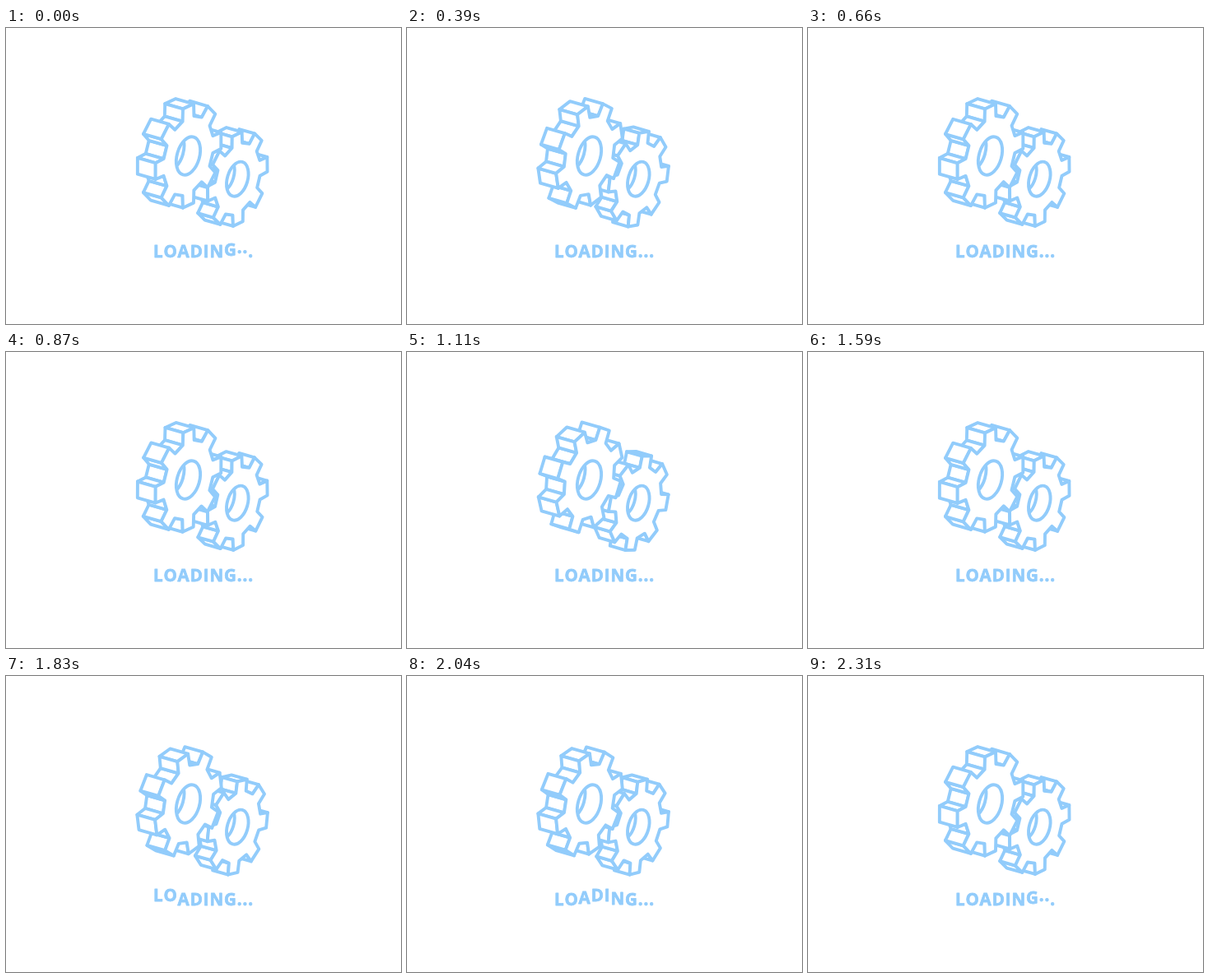
Write an HTML page with a canvas that moves like this. It is 480 px wide and 360 px high and loops after 2.34 s.

```html
<!DOCTYPE html>
<html>
<head>
<meta charset="utf-8">
<style>
  html, body { margin: 0; height: 100%; overflow: hidden; background: #fff; }
  canvas { display: block; }
</style>
</head>
<body>
<canvas id="stage" width="480" height="360"></canvas>
<script>
const ctx = document.getElementById('stage').getContext('2d');
const BLUE = '#92ccfb';
const RAD = Math.PI / 180;
const TILT = 16 * RAD, SQUASH = 0.573;
const FRAME = 30, LOOP = 2340, CYCLE = 2310, TURN = 770;
const TEETH = 8, ROOT = 0.76, HOLE = 0.363;

const big = { x: 221.5, y: 155.5, size: 65.5, depth: 22.7, phase: 18.5, spin: 1 };
const small = { x: 281.3, y: 183.7, size: 59.5, depth: 19.5, phase: 17.5, spin: -1 };

const easeInOutQuint = p => p < 0.5 ? 16 * p ** 5 : 1 - 16 * (1 - p) ** 5;

// Point on the tilted front disc; angle is clockwise from the top.
function project(gear, angle, radius) {
  const u = gear.size * radius * Math.cos(angle * RAD);
  const v = gear.size * SQUASH * radius * Math.sin(angle * RAD);
  return [
    gear.x + u * Math.sin(TILT) + v * Math.cos(TILT),
    gear.y - u * Math.cos(TILT) + v * Math.sin(TILT)
  ];
}

function outline(gear, turn) {
  const points = [];
  for (let i = 0; i < TEETH; i++) {
    const mid = gear.phase + gear.spin * turn + i * 360 / TEETH;
    for (const [offset, radius] of [[-13, ROOT], [-9.3, 1], [9.3, 1], [13, ROOT]])
      points.push(project(gear, mid + offset, radius));
  }
  return points;
}

function drawPolygon(points) {
  ctx.beginPath();
  points.forEach(p => ctx.lineTo(...p));
  ctx.closePath();
  ctx.fill();
  ctx.stroke();
}

function holePath(gear, dx = 0, dy = 0) {
  const r = gear.size * HOLE;
  ctx.beginPath();
  ctx.ellipse(gear.x + dx, gear.y + dy, r * SQUASH, r, TILT, 0, 2 * Math.PI);
}

function drawGear(gear, turn) {
  const dx = -gear.depth * Math.cos(TILT), dy = -gear.depth * Math.sin(TILT);
  const front = outline(gear, turn);
  const along = ([p, q]) => (p[0] + q[0]) * dx + (p[1] + q[1]) * dy;

  // Rim faces turned to the viewer, farthest first.
  front.map((p, i) => [p, front[(i + 1) % front.length]])
    .filter(([p, q]) => (q[1] - p[1]) * dx - (q[0] - p[0]) * dy > 0)
    .sort((a, b) => along(a) - along(b))
    .forEach(([p, q]) => drawPolygon([p, q, [q[0] + dx, q[1] + dy], [p[0] + dx, p[1] + dy]]));

  drawPolygon(front);

  ctx.save();
  holePath(gear);
  ctx.clip();
  holePath(gear, dx * 0.9, dy * 0.9);
  ctx.stroke();
  ctx.restore();
  holePath(gear);
  ctx.stroke();
}

function drawText(t) {
  ctx.font = 'bold 20.5px "Open Sans", sans-serif';
  ctx.fillStyle = BLUE;
  ctx.lineWidth = 0.8;
  let x = 178.9;
  [...'LOADING...'].forEach((letter, i) => {
    const p = ((t - 1685 - i * 68.6 + CYCLE) % CYCLE) / 242;
    const lift = p < 1 ? 6 * Math.sin(Math.PI * p) : 0;
    ctx.fillText(letter, x, 279.3 - lift);
    ctx.strokeText(letter, x, 279.3 - lift);
    x += ctx.measureText(letter).width + 0.9;
  });
}

function draw(now) {
  const t = Math.floor(now % LOOP / FRAME) * FRAME % CYCLE;
  const turn = 180 * easeInOutQuint((t + 29) % TURN / TURN);
  ctx.fillStyle = '#fff';
  ctx.fillRect(0, 0, 480, 360);
  ctx.strokeStyle = BLUE;
  ctx.lineWidth = 3.9;
  ctx.lineJoin = 'round';
  drawGear(small, turn);
  drawGear(big, turn);
  drawText(t);
}

const start = performance.now();
function tick() {
  draw(performance.now() - start);
  requestAnimationFrame(tick);
}
tick();
</script>
</body>
</html>
```
